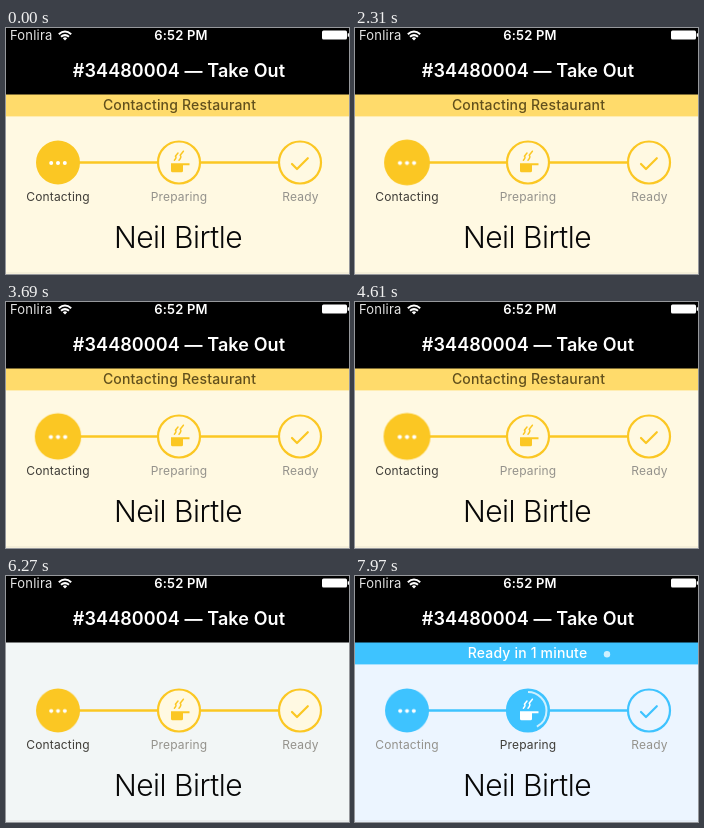
These frames come from a looping animation (343 by 246 pixels, 8000 ms). An HTML page:

```html
<!DOCTYPE html>
<html lang="en">
<head>
<meta charset="utf-8">
<title>Order status</title>
<style>
  html, body { margin: 0; width: 100%; height: 100%; overflow: hidden; background: #000; }
  svg { display: block; width: 343px; height: 246px; font-family: Inter, Roboto, sans-serif; }
  text { text-anchor: middle; }
  .label { font-size: 12px; letter-spacing: .15px; }
  .banner { font-size: 14px; font-weight: 500; letter-spacing: .18px; }
  .line { fill: none; stroke: currentColor; stroke-width: 2.2; }
  .icon { stroke-linecap: round; stroke-linejoin: round; }
  #pulse { transform-origin: 52px 134.5px; }
</style>
</head>
<body>
<svg viewBox="0 0 343 246">
  <defs>
    <clipPath id="below"><rect y="66" width="343" height="180"/></clipPath>
  </defs>

  <rect id="page" y="66" width="343" height="180" fill="#fff9e2"/>
  <rect y="244" width="343" height="2" fill="#000" opacity=".04"/>

  <g clip-path="url(#below)">
    <g id="contactBanner">
      <rect y="66" width="343" height="22.4" fill="#ffdb6b"/>
      <text class="banner" x="173.5" y="82" fill="#62501c">Contacting Restaurant</text>
    </g>
    <g id="readyBanner">
      <rect y="66" width="343" height="22.4" fill="#3ec3ff"/>
      <text class="banner" x="172.5" y="82" fill="#fff">Ready in 1 minute</text>
      <circle id="beacon" cx="252" cy="78.3" r="3.2" fill="#fff"/>
    </g>
  </g>

  <g id="steps" color="#fbc723">
    <path class="line" d="M73 134.5H152M194 134.5H273" style="stroke-width:2.5"/>
    <g id="pulse">
      <circle cx="52" cy="134.5" r="22" fill="currentColor"/>
      <g fill="#fff">
        <circle cx="45.2" cy="135" r="2"/>
        <circle cx="52" cy="135" r="2"/>
        <circle cx="58.8" cy="135" r="2"/>
      </g>
    </g>
    <circle id="prepDisc" class="line" cx="173" cy="134.5" r="21"/>
    <circle id="arc" cx="173" cy="134.5" r="18.5" fill="none" stroke="#fff" stroke-opacity=".75"
      stroke-width="2" pathLength="100" stroke-dasharray="100" transform="rotate(-90 173 134.5)"/>
    <g id="pot">
      <path d="M165 135.2H183.5V137.2H177V142.8Q177 144.3 175.5 144.3H166.5Q165 144.3 165 142.8Z" fill="currentColor"/>
      <path class="line icon" style="stroke-width:1.5"
        d="M172 125l-2.6 3.2q1.6 1.2-1 4M177.4 123.2l-3.2 4q1.8 1.6-1.2 5"/>
    </g>
    <circle id="readyDisc" class="line" cx="294" cy="134.5" r="21"/>
    <path class="line icon" d="M286 136l5 5L301.8 130.2"/>
  </g>

  <g class="label">
    <text id="contactLabel" x="52" y="172.5">Contacting</text>
    <text id="prepLabel" x="173" y="172.5">Preparing</text>
    <text x="294.5" y="172.5" fill="#94928c">Ready</text>
  </g>
  <text x="172" y="220" font-size="30" font-weight="300" letter-spacing="-.5" fill="#080808">Neil Birtle</text>

  <rect width="343" height="66.5"/>
  <g fill="#fff">
    <text x="4" y="12" font-size="13" letter-spacing=".2" style="text-anchor:start" fill="#e4e4e4">Fonlira</text>
    <text x="175" y="12" font-size="13" font-weight="600" letter-spacing=".2">6:52 PM</text>
    <text x="173" y="49" font-size="18" font-weight="600" letter-spacing=".1">#34480004 — Take Out</text>
    <path d="M52.8 6.2q6.2-5.4 12.4 0M55 8.8q4-3.3 8 0" fill="none" stroke="#fff" stroke-width="2"/>
    <path d="M56.8 10.2q2.2-1.7 4.4 0L59 12.6Z"/>
    <rect x="316" y="2.5" width="25" height="9" rx="1.5"/>
    <rect x="341.7" y="5.3" width="1.3" height="3.4"/>
  </g>
</svg>
<script>
  const LOOP = 8000;
  const YELLOW = '#fbc723', BLUE = '#3ec3ff', CREAM = '#fff9e2', ICE = '#ecf5ff';
  const DARK = '#3f3d38', GREY = '#94928c';

  // Each step is [time in ms, styles]; the first and last values are held.
  function play(id, steps, easing = 'ease-in-out') {
    const all = [[0, steps[0][1]], ...steps, [LOOP, steps[steps.length - 1][1]]];
    document.getElementById(id).animate(
      all.map(([time, style]) => ({ offset: time / LOOP, easing, ...style })),
      { duration: LOOP, iterations: Infinity }
    );
  }

  const change = (id, prop, from, to, start, end, easing) =>
    play(id, [[start, { [prop]: from }], [end, { [prop]: to }]], easing);

  const beats = [];
  for (let time = 30; time < 6000; time += 1000) {
    beats.push([time, { transform: 'scale(1)' }], [time + 500, { transform: 'scale(1.07)' }]);
  }
  beats.push([6030, { transform: 'scale(1)' }]);
  play('pulse', beats);

  const shown = 'translateY(0px)', hidden = 'translateY(-23px)';
  change('contactBanner', 'transform', shown, hidden, 5880, 6200);
  change('page', 'fill', CREAM, ICE, 5900, 6500);

  const recolor = (id, prop, from, to) => change(id, prop, from, to, 6600, 7050);
  recolor('steps', 'color', YELLOW, BLUE);
  recolor('prepDisc', 'fill', CREAM, BLUE);
  recolor('readyDisc', 'fill', CREAM, ICE);
  recolor('pot', 'color', YELLOW, '#ffffff');
  recolor('contactLabel', 'fill', DARK, GREY);
  recolor('prepLabel', 'fill', GREY, DARK);

  change('readyBanner', 'transform', hidden, shown, 7050, 7500);
  change('arc', 'strokeDashoffset', '100', '58', 7590, 7970, 'ease-out');
  change('beacon', 'opacity', 0, .75, 7590, 7970, 'linear');
</script>
</body>
</html>
```
